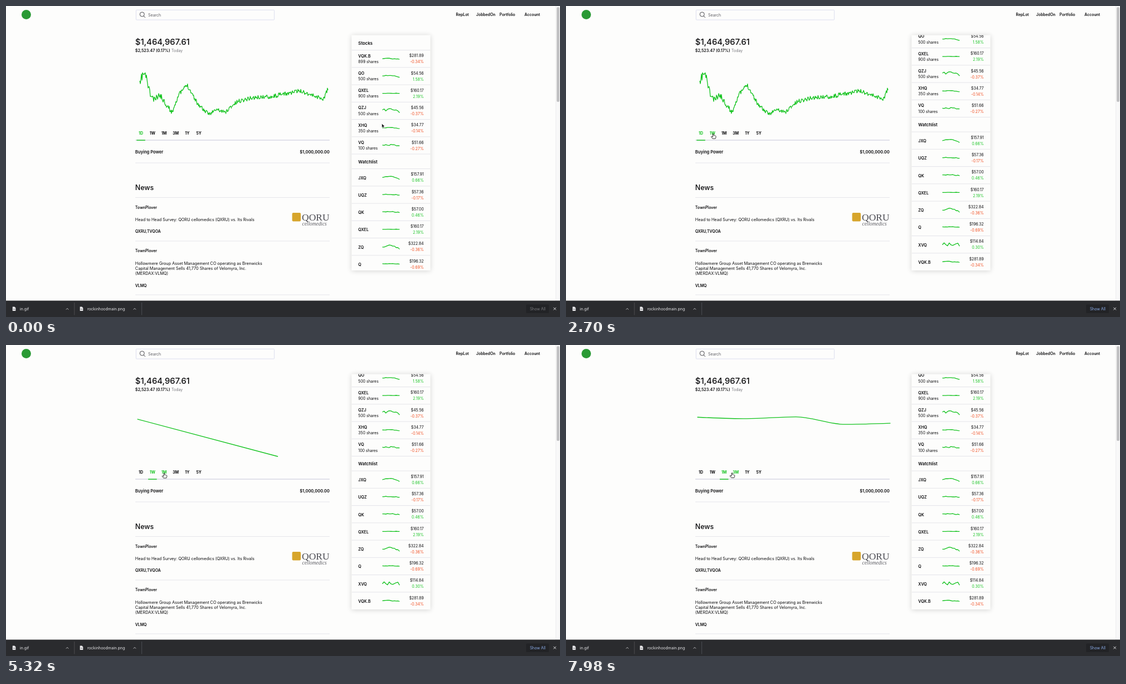
An HTML page that plays this animation: 998 by 561 pixels, repeating every 8000 ms.

```html
<!DOCTYPE html>
<html lang="en">
<head>
<meta charset="utf-8">
<style>
html, body { margin: 0; width: 100%; height: 100%; overflow: hidden; background: #fdfdfc; }
svg { display: block; width: 998px; height: 561px; font-family: Inter, "Open Sans", sans-serif; }
.serif { font-family: "Liberation Serif", "Noto Serif", serif; }
</style>
</head>
<body>
<svg viewBox="0 0 998 561">
  <defs>
    <clipPath id="cardClip"><rect x="622.5" y="52.5" width="142" height="424.5"/></clipPath>
    <filter id="soft" x="-20%" y="-10%" width="140%" height="120%"><feGaussianBlur stdDeviation="5"/></filter>
  </defs>
  <g id="page"></g>
  <g id="tabs"></g>
  <path id="chart" fill="none" stroke="#14c31f" stroke-width="1.3" stroke-linejoin="round" stroke-linecap="round"/>
  <rect x="622.5" y="53" width="142" height="425" opacity=".16" filter="url(#soft)"/>
  <rect x="622.5" y="52.5" width="142" height="424.5" fill="#fdfdfc"/>
  <g clip-path="url(#cardClip)"><g id="list"></g></g>
  <g id="shelf"></g>
  <g id="arrow">
    <path d="M0 0V7.6L1.8 6L3 8.7L4.4 8.1L3.2 5.5H5.6Z" fill="#111" stroke="#fff" stroke-width=".7"/>
  </g>
  <g id="hand">
    <path d="M-.8 .6Q0-.7 .8 .6V3.2Q1.8 2.6 2.4 3.6Q3.3 3 3.8 4Q4.7 3.8 4.8 4.9V6.6L3.8 9H-1.2L-3.8 5.6Q-3.4 4.4-2 5.2L-.8 6Z" fill="#fff" stroke="#111" stroke-width=".85" stroke-linejoin="round"/>
  </g>
</svg>
<script>
const GREEN = '#14c31f', RED = '#f04a1c', INK = '#0a0a0c', RULE = '#e3e3e8';
const LOOP = 8000, LEFT = 232.8, RIGHT = 583;
const $ = id => document.getElementById(id);
const lerp = (a, b, k) => a + (b - a) * k;
const clamp = k => Math.max(0, Math.min(1, k));
const smooth = k => k * k * (3 - 2 * k);

function add(parent, tag, attrs, text) {
  const el = document.createElementNS('http://www.w3.org/2000/svg', tag);
  for (const k in attrs) el.setAttribute(k, attrs[k]);
  if (text !== undefined) el.textContent = text;
  parent.appendChild(el);
  return el;
}
// Text is placed by the vertical middle of its capitals.
const label = (parent, x, mid, text, size, weight = 400, fill = INK, anchor = 'start', extra = {}) =>
  add(parent, 'text', {
    x, y: mid + size * 0.36, 'font-size': size, 'font-weight': weight, fill, 'text-anchor': anchor, ...extra
  }, text);
const bold = (parent, x, mid, text, size = 6.9) => label(parent, x, mid, text, size, 600);
const line = (parent, d, stroke = RULE, w = 0.9) =>
  add(parent, 'path', { d, stroke, 'stroke-width': w, fill: 'none', 'stroke-linejoin': 'round' });

// Seeded random numbers in -0.5..0.5
function random(seed) {
  return () => (seed = (seed * 16807) % 2147483647) / 2147483647 - 0.5;
}

// CSS "ease" timing curve
function ease(x) {
  const bez = (a, b, u) => 3 * a * u * (1 - u) ** 2 + 3 * b * u * u * (1 - u) + u ** 3;
  let lo = 0, hi = 1;
  for (let i = 0; i < 24; i++) {
    const mid = (lo + hi) / 2;
    if (bez(0.25, 0.25, mid) < clamp(x)) lo = mid; else hi = mid;
  }
  return bez(0.1, 1, lo);
}

function buildPage() {
  const g = $('page');
  add(g, 'circle', { cx: 36.5, cy: 15.5, r: 8.5, fill: '#2a9a35' });
  add(g, 'rect', { x: 234.3, y: 7.2, width: 249, height: 17.8, rx: 1, fill: 'none', stroke: '#d9dbee', 'stroke-width': 0.9 });
  line(g, 'M249.2 15a4 4 0 1 1-8 0a4 4 0 1 1 8 0M248 18l3 3', '#3a3a40');
  label(g, 256, 16, 'Search', 7, 400, '#5c5c62');
  bold(g, 810.5, 16, 'RepLot');
  bold(g, 847, 16, 'JobbedOn');
  bold(g, 889, 16, 'Portfolio');
  bold(g, 934, 16, 'Account');

  label(g, LEFT, 65, '$1,464,967.61', 14.9, 500);
  bold(g, LEFT, 80, '$2,523.47 (0.17%)', 7.1);
  label(g, 298, 80, 'Today', 7, 400, '#77777c');

  bold(g, LEFT, 263, 'Buying Power', 7.6);
  label(g, RIGHT, 263, '$1,000,000.00', 7.5, 600, INK, 'end');
  label(g, LEFT, 328, 'News', 12.4, 500);
  for (const y of [283, 345.5, 424, 521]) line(g, `M233 ${y}H${RIGHT}`);

  bold(g, LEFT, 363.3, 'TownPlover');
  label(g, LEFT, 385.3, 'Head to Head Survey: QORU cellomedics (QXRU) vs. Its Rivals', 7.3);
  bold(g, LEFT, 407, 'QXRU,TVQOA');
  add(g, 'rect', { x: 515.5, y: 373, width: 15.5, height: 15.5, rx: 2, fill: '#d7a52c' });
  label(g, 533, 380.5, 'QORU', 17.5, 400, '#4b4b52', 'start', { class: 'serif' });
  label(g, 533.5, 392.5, 'cellomedics', 9.4, 400, '#5d5d64', 'start', { class: 'serif', 'font-style': 'italic' });

  bold(g, LEFT, 441.7, 'TownPlover');
  ['Hollowmere Group Asset Management CO operating as Brenwicks',
    'Capital Management Sells 41,770 Shares of Velomyra, Inc.', '(MERDAX:VLMQ)']
    .forEach((s, i) => label(g, LEFT, 464 + i * 9.3, s, 7.3));
  bold(g, LEFT, 504.3, 'VLMQ');

  add(g, 'rect', { x: 990.5, y: 0, width: 7.5, height: 532, fill: '#f8f8f8' });
  line(g, 'M990.5 0V532', '#e8e8e8', 0.7);
  add(g, 'rect', { x: 992, y: 2, width: 5, height: 171, rx: 2.5, fill: '#c1c1c3' });
}

// Roughness and final drop shape each small price line.
const stocks = [
  { sym: 'VQK.B', shares: 899, price: '281.89', pct: -0.34, rough: 1.6, drop: 0.8 },
  { sym: 'QO', shares: 500, price: '54.56', pct: 1.58, rough: 1, drop: 2.2 },
  { sym: 'QXEL', shares: 900, price: '160.17', pct: 2.19, rough: 0.5, drop: 0 },
  { sym: 'QZJ', shares: 500, price: '45.56', pct: -0.37, rough: 5, drop: 3 },
  { sym: 'XHQ', shares: 350, price: '34.77', pct: -0.14, rough: 0.8, drop: 1.4 },
  { sym: 'VQ', shares: 100, price: '51.66', pct: -0.27, rough: 2.2, drop: 1.5 }
];
const watch = [
  { sym: 'JXQ', price: '157.91', pct: 0.66, rough: 0.8, drop: 4 },
  { sym: 'UQZ', price: '57.36', pct: -0.17, rough: 1.2, drop: 1 },
  { sym: 'QK', price: '57.00', pct: 0.46, rough: 1.5, drop: 0.8 },
  stocks[2],
  { sym: 'ZQ', price: '322.84', pct: -0.36, rough: 3, drop: 3.5 },
  { sym: 'Q', price: '196.32', pct: -0.69, rough: 1, drop: 0.4 },
  { sym: 'XVQ', price: '114.84', pct: 0.3, rough: 6, drop: 0.5 },
  stocks[0]
];

function spark(top, { price, rough, drop }) {
  const rnd = random(price.replace('.', '') * 7), n = 10, pts = [];
  for (let i = 0; i <= n; i++) {
    const u = i / n;
    const y = rough * rnd() - 0.6 - drop * 0.5 * Math.sin(Math.PI * u) + drop * u ** 3;
    pts.push(`${678 + 31 * u} ${top + 16 + y}`);
  }
  return 'M' + pts.join('L');
}

function row(g, top, item, inWatchlist) {
  bold(g, 634.6, top + (inWatchlist ? 16.4 : 10.4), item.sym, 7.1);
  if (!inWatchlist) label(g, 634.6, top + 20.9, item.shares + ' shares', 6.9);
  label(g, 752.5, top + 10.4, '$' + item.price, 6.9, 400, INK, 'end');
  label(g, 752.5, top + 21.4, item.pct.toFixed(2) + '%', 6.9, 400, item.pct < 0 ? RED : GREEN, 'end');
  line(g, spark(top, item), GREEN, 1.3);
  line(g, `M622.5 ${top}H764.5`);
}

function buildList() {
  const g = $('list'), step = 31.25;
  bold(g, 634.6, 67, 'Stocks', 7.8);
  stocks.forEach((s, i) => row(g, 79.6 + i * step, s, false));
  line(g, 'M622.5 267H764.5');
  bold(g, 634.6, 281, 'Watchlist', 7.7);
  watch.forEach((s, i) => row(g, 293.6 + i * step, s, true));
}

let tabs, underline, showAll;
function buildTabs() {
  const g = $('tabs');
  line(g, `M233 242H${RIGHT}`, '#d9d9e4', 1.4);
  underline = add(g, 'rect', { y: 241.4, width: 15.6, height: 1.4, fill: GREEN });
  tabs = ['1D', '1W', '1M', '3M', '1Y', '5Y'].map((name, i) => {
    const x = 243 + i * 20.9;
    return { x, el: label(g, x, 229.3, name, 6.9, 700, INK, 'middle') };
  });
}

function buildShelf() {
  const g = $('shelf');
  add(g, 'rect', { x: 0, y: 531.5, width: 998, height: 29.5, fill: '#2a2b2e' });
  ['in.gif', 'rockinhoodmain.png'].forEach((name, i) => {
    const x = i * 121.4;
    add(g, 'path', { d: `M${x + 11.8} 542.5h3.6l2 2v5.5h-5.6z`, fill: '#e8e8ea' });
    line(g, `M${x + 13} 547h3.2`, '#55565a');
    label(g, x + 25, 546.7, name, 7, 400, '#e6e6e8');
    line(g, `M${x + 108.2} 547.6l2.2-2.2l2.2 2.2`, '#d6d6d8');
    line(g, `M${x + 123.2} 535V557.5`, '#56575b', 0.8);
  });
  add(g, 'rect', { x: 937, y: 538.5, width: 41, height: 15.5, rx: 1.5, fill: '#222326' });
  showAll = label(g, 957.8, 546.3, 'Show All', 6.9, 400, '', 'middle');
  line(g, 'M986.3 543.8l4.6 4.6m0-4.6l-4.6 4.6', '#e0e0e2', 1);
}

// Day chart: key points joined with jitter that calms down to the right
const keys = [
  [241, 146], [246, 122], [252, 126], [260, 160], [267, 170], [277, 160], [289, 178], [299, 192], [310, 162], [326, 142],
  [337, 161], [345, 176], [364, 195], [380, 187], [395, 192], [405, 182], [418, 172], [440, 166], [480, 163], [530, 153],
  [572, 168], [580, 149]
];
const gaps = [396, 407, 418];
function dayPath() {
  const rnd = random(11);
  let d = '', k = 0;
  for (let x = 241; x <= 580; x++) {
    while (x > keys[k + 1][0]) k++;
    const [[x0, y0], [x1, y1]] = keys.slice(k, k + 2);
    const y = lerp(y0, y1, (x - x0) / (x1 - x0)) + rnd() * (7.5 + 14 * Math.exp((241 - x) / 22));
    d += `${!d || gaps.includes(x) ? 'M' : 'L'}${x} ${y.toFixed(1)}`;
  }
  return d;
}

// Monotone cubic through the points
function curve(p) {
  const n = p.length - 1, s = [], m = [];
  for (let i = 0; i < n; i++) s[i] = (p[i + 1][1] - p[i][1]) / (p[i + 1][0] - p[i][0]);
  for (let i = 1; i < n; i++) m[i] = s[i - 1] * s[i] <= 0 ? 0 : 2 * s[i - 1] * s[i] / (s[i - 1] + s[i]);
  m[0] = (3 * s[0] - m[1]) / 2;
  m[n] = (3 * s[n - 1] - m[n - 1]) / 2;
  let d = `M${p[0]}`;
  for (let i = 0; i < n; i++) {
    const [x0, y0] = p[i], [x1, y1] = p[i + 1], h = (x1 - x0) / 3;
    d += `C${x0 + h} ${y0 + h * m[i]} ${x1 - h} ${y1 - h * m[i + 1]} ${x1} ${y1}`;
  }
  return d;
}

const WEEK = 4807, MONTH = 6875, MORPH = 1900;
const day = dayPath();
function chartPath(t) {
  if (t < WEEK) return day;
  if (t < MONTH) {
    const e = ease((t - WEEK) / MORPH);
    return `M237 ${lerp(154.5, 109, e)}L${lerp(411, 584, e)} 201`;
  }
  // A falling line with a flat end turns into five evenly spaced points.
  const e = ease((t - MONTH) / MORPH);
  return curve([133.5, 119, 110.5, 121.5, 119].map((y, i) => [
    lerp(Math.min(237 + i * 101, 584), 237 + i * 86.75, e),
    lerp(Math.min(108 + i * 31.8, 205), y, e) + 13.5 * e * Math.min(i, 1) * smooth(e)
  ]));
}

// Pointer moves: start, end, x, y
const moves = [
  [800, 1750, 273.5, 238.5], [2300, 2750, 265, 230], [4880, 5200, 285, 231], [6600, 6850, 287, 231], [7500, 7960, 299, 230.5]
];
const pointer = t => moves.reduce(([x, y], [from, to, x1, y1]) => {
  const k = smooth(clamp((t - from) / (to - from)));
  return [lerp(x, x1, k), lerp(y, y1, k)];
}, [677, 212]);

function draw(t) {
  $('list').setAttribute('transform', `translate(0 ${-66.5 * smooth(clamp((t - 60) / 680))})`);
  $('chart').setAttribute('d', chartPath(t));

  const [x, y] = pointer(t), active = t < WEEK ? 0 : t < MONTH ? 1 : 2;
  const hover = y > 222 && y < 237 ? tabs.findIndex(tab => Math.abs(x - tab.x) < 8.6) : -1;
  tabs.forEach((tab, i) => tab.el.setAttribute('fill', i === hover || i === active ? GREEN : INK));
  underline.setAttribute('x', tabs[active].x - 7.8);
  showAll.setAttribute('fill', t < 2700 ? '#7c7d81' : '#8fb0ee');
  for (const [id, on] of [['arrow', hover < 0], ['hand', hover >= 0]]) {
    $(id).setAttribute('transform', `translate(${x} ${y})`);
    $(id).setAttribute('visibility', on ? 'visible' : 'hidden');
  }
}

buildPage();
buildTabs();
buildList();
buildShelf();
const start = performance.now();
function tick() {
  draw((performance.now() - start) % LOOP);
  requestAnimationFrame(tick);
}
tick();
</script>
</body>
</html>
```
